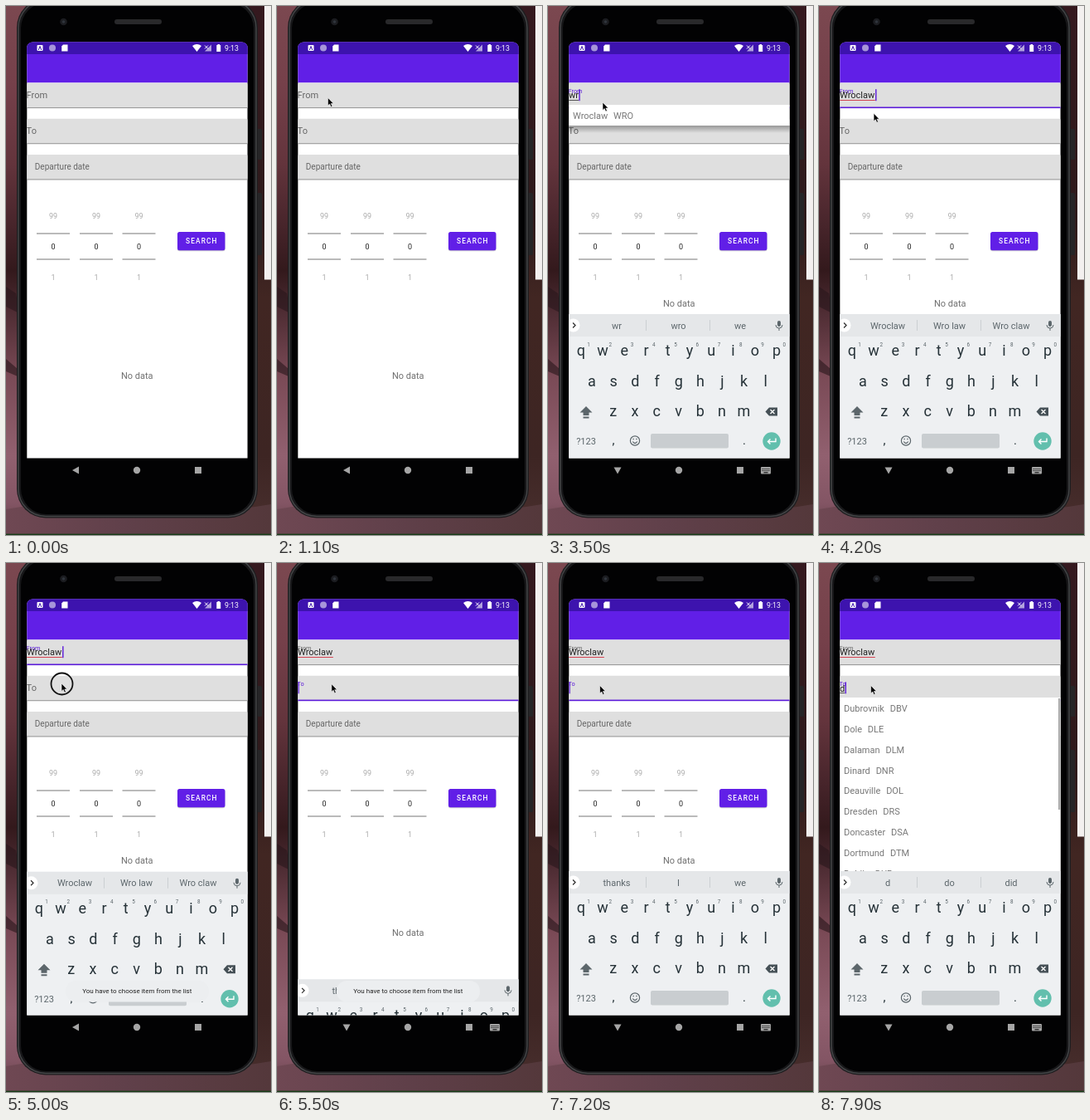
Animation, 320 px wide and 637 px high, one loop 8 s. Source, as an HTML page:

```html
<!DOCTYPE html>
<html lang="en">
<head>
<meta charset="utf-8">
<title>Flight search</title>
<style>
  html, body { margin: 0; width: 100%; height: 100%; overflow: hidden; background: #000; }
  svg { display: block; width: 100%; height: 100%; }
  text { font-family: Roboto, sans-serif; white-space: pre; }
  #items { word-spacing: .7px; }
</style>
</head>
<body>
<svg id="stage" viewBox="0 0 320 637" preserveAspectRatio="none">
  <defs>
    <linearGradient id="rock" x1="0" y1="0" x2="0" y2="1">
      <stop offset="0" stop-color="#7b4850"/>
      <stop offset=".15" stop-color="#75404a"/>
      <stop offset=".3" stop-color="#63343c"/>
      <stop offset=".42" stop-color="#46242a"/>
      <stop offset=".5" stop-color="#33191c"/>
      <stop offset=".58" stop-color="#4f2d34"/>
      <stop offset=".7" stop-color="#7a4a56"/>
      <stop offset=".85" stop-color="#91606f"/>
      <stop offset=".94" stop-color="#835564"/>
      <stop offset="1" stop-color="#5d3c44"/>
    </linearGradient>
    <linearGradient id="dusk" x1="0" y1="0" x2="0" y2="1">
      <stop offset="0" stop-color="#35191f"/>
      <stop offset=".4" stop-color="#2e1a1b"/>
      <stop offset=".55" stop-color="#412622"/>
      <stop offset=".85" stop-color="#3d2523"/>
      <stop offset="1" stop-color="#4a302f"/>
    </linearGradient>
    <linearGradient id="ground">
      <stop offset="0" stop-color="#6f4853"/>
      <stop offset=".45" stop-color="#60404a"/>
      <stop offset="1" stop-color="#54383b"/>
    </linearGradient>
    <linearGradient id="shade" x1="0" y1="0" x2="0" y2="1">
      <stop offset="0" stop-color="#000" stop-opacity=".32"/>
      <stop offset="1" stop-color="#000" stop-opacity="0"/>
    </linearGradient>
    <clipPath id="screen"><path d="M25.300 544.500V51Q25.300 43.500 33 43.500H284Q291.600 43.500 291.600 51V544.500Z"/></clipPath>
  </defs>

  <rect width="160" height="637" fill="url(#rock)"/>
  <path d="M0 338L12 346L16 370L0 362ZM0 425L14 437V446L0 440Z" fill="#29161b" opacity=".6"/>
  <rect x="150" width="170" height="637" fill="url(#dusk)"/>
  <path d="M0 606Q60 594 150 604T320 600V637H0Z" fill="url(#ground)"/>
  <rect x="312" width="8" height="329.500" fill="#f3f0ef"/>
  <rect y="635.600" width="320" height="1.400" fill="#173d18"/>

  <rect x="303" y="148" width="6" height="37" rx="1.500" fill="#262527"/>
  <rect x="303" y="225" width="6" height="75" rx="1.500" fill="#262527"/>
  <rect x="13" y="-9" width="291" height="625.500" rx="35" fill="#1d1d1f"/>
  <rect x="15" y="-7" width="287" height="621.500" rx="33" fill="#171719" stroke="#434446" stroke-width="1.500"/>
  <rect x="18" y="-4" width="281" height="616" rx="31" fill="#020203"/>
  <rect x="131" y="16" width="57" height="6" rx="3" fill="#29292b"/>
  <circle cx="69.500" cy="19" r="4.300" fill="#1b1c20"/>
  <circle cx="69.500" cy="19" r="1.800" fill="#30353d"/>

  <g clip-path="url(#screen)">
    <rect x="25" y="43" width="267" height="502" fill="#fff"/>
    <rect x="25" y="43" width="267" height="49.300" fill="#611fe7"/>
    <rect x="25" y="43" width="267" height="15" fill="#3d13ae"/>
    <g fill="#fff">
      <rect x="37.500" y="47" width="7" height="7" rx="1"/>
      <path d="M39.300 53L41 48.500L42.700 53" fill="none" stroke="#3d13ae"/>
      <circle cx="56" cy="50.500" r="4" opacity=".55"/>
      <path d="M69 46.500H74.500V54.500H67.200V48.500Z"/>
      <path d="M225 48Q230.500 44 236 48L230.500 55Z"/>
      <path d="M240 54.500L248 46.500V54.500Z" opacity=".6"/>
      <path d="M240 47.500L244 51.500M244 47.500L240 51.500" stroke="#fff"/>
      <path d="M255.500 46H258V47H259.200V55H254.300V47H255.500Z"/>
      <text x="264" y="53.700" font-size="8.800">9:13</text>
    </g>
    <g id="form"></g>
    <text id="empty" x="158.300" font-size="11" text-anchor="middle" fill="#707070">No data</text>
    <g id="menu">
      <rect id="menuShade" x="25" width="267" height="9" fill="url(#shade)"/>
      <rect id="menuBox" x="25" width="267" fill="#fff"/>
      <g id="items"></g>
      <rect id="scrollbar" x="289" y="163" width="2.500" height="134" fill="#aaa"/>
    </g>
    <g id="keyboard"></g>
    <g id="toast">
      <rect x="72" y="503" width="173" height="25.500" rx="12" fill="#eceef0"/>
      <text x="158.300" y="517.500" font-size="8" text-anchor="middle" fill="#222">You have to choose item from the list</text>
    </g>
  </g>

  <g fill="#a5a5a5">
    <path id="back"/>
    <circle cx="158" cy="559" r="4.200"/>
    <rect x="228" y="555" width="8" height="8"/>
    <g id="imeIcon">
      <rect x="257" y="555" width="12" height="8.500" rx="1"/>
      <path d="M258.500 557.500H268M258.500 559.500H268" stroke="#000" stroke-dasharray="1 1"/>
      <path d="M260.500 561.800H265.500" stroke="#000"/>
    </g>
  </g>

  <circle id="tap" r="13" fill="none" stroke="#111" stroke-width="1.800"/>
  <path id="pointer" d="M0 0V9.500L2.200 7.500L3.700 11L5.400 10.200L3.900 7H6.800Z" fill="#000" stroke="#fff" stroke-width=".6"/>
</svg>

<script>
const DURATION = 8000, STEP = 100;
const PURPLE = '#5b1ad9';
const $ = id => document.getElementById(id);
const clamp = v => Math.max(0, Math.min(1, v));
const ramp = (t, from, to) => clamp((t - from) / (to - from));
const mix = (a, b, p) => a + (b - a) * p;
const ease = p => p * p * (3 - 2 * p);

function add(parent, tag, attrs, content = '') {
  const el = document.createElementNS('http://www.w3.org/2000/svg', tag);
  set(el, attrs);
  el.textContent = content;
  return parent.appendChild(el);
}
function set(el, attrs) {
  for (const name in attrs) el.setAttribute(name, attrs[name]);
}
function show(el, visible) {
  el.style.display = visible ? '' : 'none';
}
function label(parent, x, y, size, content, fill, anchor = 'middle') {
  return add(parent, 'text', { x, y, 'font-size': size, fill, 'text-anchor': anchor }, content);
}

const form = $('form'), keyboard = $('keyboard');

function makeField(y, name) {
  add(form, 'path', { d: `M25 ${y + 30}V${y + 2}Q25 ${y} 27 ${y}H290Q292 ${y} 292 ${y + 2}V${y + 30}Z`, fill: '#dfdfdf' });
  return {
    y,
    line: add(form, 'rect', { x: 25, width: 267 }),
    hint: label(form, 24.6, 0, 11, name, '#666', 'start'),
    underline: add(form, 'rect', { x: 25, y: y + 20.3, height: 0.9 }),
    value: label(form, 25, y + 18.7, 11, '', '#222', 'start'),
    caret: add(form, 'rect', { y: y + 7.5, width: 1.4, height: 14, fill: PURPLE })
  };
}

function buildForm() {
  add(form, 'rect', { x: 25, y: 179, width: 267, height: 30, rx: 2, fill: '#dfdfdf' });
  add(form, 'rect', { x: 25, y: 208.5, width: 267, height: 0.9, fill: '#888' });
  label(form, 34.8, 196.8, 10, 'Departure date', '#666', 'start');
  for (const x of [57, 109, 160.5]) {
    label(form, x, 256, 9, '99', '#aaa');
    label(form, x, 292.8, 9, '0', '#222');
    label(form, x, 329.5, 9, '1', '#aaa');
    for (const y of [273.5, 304.5]) add(form, 'rect', { x: x - 20, y, width: 40, height: 1, fill: '#777' });
  }
  add(form, 'rect', { x: 207, y: 273.2, width: 57.5, height: 22, rx: 2.5, fill: '#000', opacity: 0.2 });
  add(form, 'rect', { x: 207, y: 272, width: 57.5, height: 22.3, rx: 2.5, fill: '#611fe7' });
  set(label(form, 217, 286.3, 8.4, 'SEARCH', '#fff', 'start'), { 'font-weight': 500, 'letter-spacing': 1.1 });
}

function buildKeyboard() {
  const ink = '#263238', soft = '#5c666b';
  add(keyboard, 'rect', { x: 25, y: 371, width: 267, height: 175, fill: '#eef0f2' });
  add(keyboard, 'rect', { x: 25, y: 371, width: 267, height: 27, fill: '#e5e7e9' });
  add(keyboard, 'circle', { cx: 30.5, cy: 384.5, r: 8, fill: '#fff' });
  add(keyboard, 'path', { d: 'M30 381.500L33 384.500L30 387.500', fill: 'none', stroke: '#333', 'stroke-width': 1.3 });
  for (const x of [118, 195]) add(keyboard, 'rect', { x, y: 378, width: 0.8, height: 13, fill: '#c5cacc' });
  add(keyboard, 'rect', { x: 277, y: 379, width: 4, height: 7, rx: 2, fill: soft });
  add(keyboard, 'path', { d: 'M275 384Q275 388 279 388T283 384M279 388V391', fill: 'none', stroke: soft });

  const rows = [['qwertyuiop', 39.8, 421], ['asdfghjkl', 52.8, 458], ['zxcvbnm', 78.8, 494]];
  for (const [keys, x0, y] of rows)
    [...keys].forEach((key, i) => label(keyboard, x0 + i * 26.25, y, 18, key, ink));
  for (let i = 0; i < 10; i++) label(keyboard, 49 + i * 26.25, 409.5, 6.3, (i + 1) % 10, soft);

  add(keyboard, 'path', { d: 'M46 482L53.500 489.500H49.500V493H42.500V489.500H38.500ZM42.500 494.500H49.500V496.500H42.500Z', fill: soft });
  add(keyboard, 'path', { d: 'M262.500 488.500L267 483.500H277V493.500H267Z', fill: '#455056' });
  add(keyboard, 'path', { d: 'M268.500 486L273.500 491M273.500 486L268.500 491', stroke: '#fff', 'stroke-width': 1.3 });
  label(keyboard, 46, 528, 11, '?123', soft);
  label(keyboard, 79, 528, 15, ',', ink);
  label(keyboard, 237, 528, 15, '.', ink);
  add(keyboard, 'circle', { cx: 105, cy: 523.5, r: 5.6, fill: 'none', stroke: soft, 'stroke-width': 1.2 });
  add(keyboard, 'path', { d: 'M102.500 521.500H103.800M106.200 521.500H107.500M102.300 524.500Q105 528.500 107.700 524.500', fill: 'none', stroke: soft, 'stroke-width': 1.3 });
  add(keyboard, 'rect', { x: 124, y: 515, width: 94, height: 17.5, rx: 2, fill: '#c9cdd0' });
  add(keyboard, 'circle', { cx: 270, cy: 524, r: 10.7, fill: '#62bfad' });
  add(keyboard, 'path', { d: 'M275 520.500V524.500H265.500M268.500 521.500L265.500 524.500L268.500 527.500', fill: 'none', stroke: '#fff', 'stroke-width': 1.4 });
  return [83, 157.5, 232].map(x => label(keyboard, x, 388.5, 11, '', soft));
}

const from = makeField(92.7, 'From'), to = makeField(135.8, 'To');
buildForm();
const words = buildKeyboard();

const cities = ['Dubrovnik  DBV', 'Dole  DLE', 'Dalaman  DLM', 'Dinard  DNR', 'Deauville  DOL',
  'Dresden  DRS', 'Doncaster  DSA', 'Dortmund  DTM', 'Dublin  DUB'];
const menuRows = cities.map(() => label($('items'), 30, 0, 11, '', '#777', 'start'));

// Each entry applies from its time onwards.
const suggestions = [[0, 'thanks|I|we'], [2500, 'w|we|what'], [3000, 'wr|wro|we'],
  [4000, 'Wroclaw|Wro law|Wro claw'], [5300, 'thanks|I|we'], [7500, 'd|do|did']];
const fromEdits = [[0, '', 0], [1600, '', 0], [2600, 'w', 8.3], [3100, 'wr', 12], [4000, 'Wroclaw', 42.8]];
const toEdits = [[0, '', 0], [5100, '', 0], [7500, 'd', 6.2]];
const taps = [1400, 3900, 4900, 5300];
const path = [[600, 92, 150], [1000, 61.5, 111], [1400, 61, 108], [2900, 61, 108], [3500, 66, 116],
  [3800, 66, 128], [4100, 66, 128], [4700, 67, 145], [5300, 67, 145], [5900, 62.6, 147.5], [8000, 62.6, 147.5]];

const current = (list, t) => list.filter(entry => entry[0] <= t).pop();

function pointerAt(t) {
  const next = path.findIndex(point => point[0] > t);
  if (next < 1) return path[0].slice(1);
  const [a, b] = [path[next - 1], path[next]];
  const p = ease(ramp(t, a[0], b[0]));
  return [mix(a[1], b[1], p), mix(a[2], b[2], p)];
}

function drawField(field, t, edits, focusAt, blurAt, typo) {
  const [editedAt, content, width] = current(edits, t);
  const focused = t >= focusAt && t < blurAt;
  const lift = ramp(t, focusAt, focusAt + 150);
  set(field.hint, { y: field.y + mix(18.2, 12.3, lift), 'font-size': mix(11, 7.3, lift), fill: focused ? PURPLE : '#666' });
  set(field.line, { y: field.y + (focused ? 28.8 : 29.5), height: focused ? 1.6 : 0.9, fill: focused ? PURPLE : '#888' });
  field.value.textContent = content;
  set(field.underline, { width, fill: typo ? '#d22f3f' : '#444' });
  set(field.caret, { x: 25.3 + width });
  show(field.caret, focused && (t - editedAt) % 1000 < 500);
}

function drawMenu(t) {
  const first = t >= 3200 && t < 4000, second = t >= 7600;
  show($('menu'), first || second);
  show($('scrollbar'), second);
  const top = second ? 162 : 119, height = second ? 220 : 25;
  set($('menuBox'), { y: top, height });
  set($('menuShade'), { y: top + height });
  menuRows.forEach((row, i) => {
    row.textContent = second ? cities[i] : i ? '' : 'Wroclaw  WRO';
    set(row, { y: top + 17 + i * 24.85 });
  });
}

function drawKeyboard(t) {
  const hide = ramp(t, 4980, 5280) ** 2;
  const shown = t < 4980 ? ease(ramp(t, 1600, 1900)) : t < 5400 ? 1 - hide : ease(ramp(t, 5400, 5700));
  const open = (t >= 1700 && t < 4980) || t >= 5500;
  set(keyboard, { transform: `translate(0 ${176 * (1 - shown)})` });
  current(suggestions, t)[1].split('|').forEach((word, i) => { words[i].textContent = word; });
  set($('empty'), { y: (t >= 1900 && t < 5100) || t >= 5700 ? 362 : 449 });
  set($('back'), { d: open ? 'M79.500 555.500H88.500L84 563.500Z' : 'M88 554.500V563.500L80 559Z' });
  show($('imeIcon'), open);
}

function draw(t) {
  drawField(from, t, fromEdits, 1500, 5100, t >= 4000);
  drawField(to, t, toEdits, 5100, Infinity, false);
  drawMenu(t);
  drawKeyboard(t);
  set($('toast'), { opacity: ramp(t, 4800, 4950) * (1 - ramp(t, 6300, 6600)) });

  const [x, y] = pointerAt(t);
  show($('pointer'), t >= 600);
  set($('pointer'), { transform: `translate(${x} ${y})` });
  show($('tap'), taps.some(at => t >= at && t < at + 200));
  set($('tap'), { cx: x + 0.5, cy: y + 0.5 });
}

const start = performance.now();
function tick() {
  const t = (performance.now() - start) % DURATION;
  draw(Math.floor(t / STEP) * STEP);
  requestAnimationFrame(tick);
}
draw(0);
requestAnimationFrame(tick);
</script>
</body>
</html>
```
